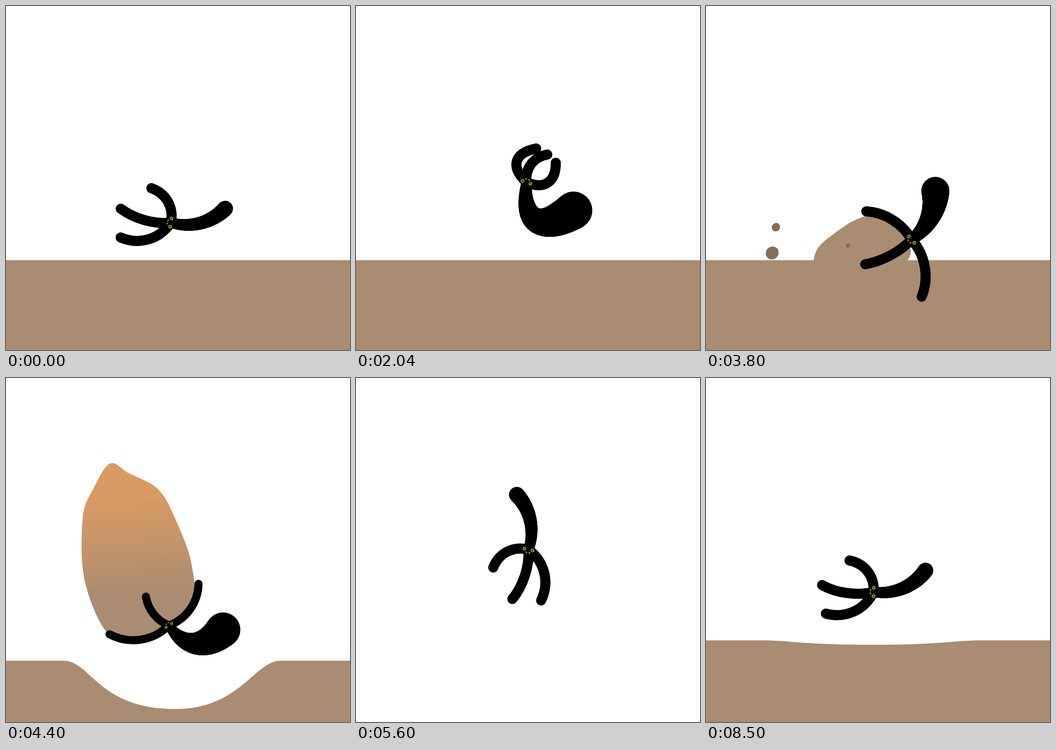
An HTML page with a canvas that plays this animation: 748 by 748 pixels, repeating every 8540 ms.

```html
<!DOCTYPE html>
<html lang="en">
<head>
<meta charset="utf-8">
<title>Lifting a boulder</title>
<style>
  html, body { margin: 0; width: 100%; height: 100%; overflow: hidden; background: #fff; }
  canvas { display: block; }
</style>
</head>
<body>
<canvas id="stage" width="748" height="748"></canvas>
<script>
const ctx = document.getElementById('stage').getContext('2d');
const LOOP = 8540, STEP = 40, SIZE = 748, GROUND = 552.7;
const SOIL = '#a98c72', STONE = '#846c5a', ORANGE = '#d99a63', YELLOW = '#dce600';

const lerp = (a, b, k) => a + (b - a) * k;
const ramp = (t, from, to) => Math.min(1, Math.max(0, (t - from) / (to - from)));
const turn = ([x, y], degrees, scale = 1) => {
  const c = Math.cos(degrees * Math.PI / 180) * scale;
  const s = Math.sin(degrees * Math.PI / 180) * scale;
  return [x * c - y * s, x * s + y * c];
};

// Blends numbers, arrays and objects of the same form.
function mix(a, b, k) {
  if (typeof a === 'number') return lerp(a, b, k);
  if (Array.isArray(a)) return a.map((v, i) => mix(v, b[i], k));
  return Object.fromEntries(Object.keys(a).map(key => [key, mix(a[key], b[key], k)]));
}

// Limb angles are seen from the face; bow is how far a limb bends away from its chord.
const BOWS = [.8, -.48, -1];
const stand = {
  x: 375, y: 373, angle: 12, scale: 1, bow: 21, angles: [141, 96, 64], lengths: [86, 113, 114],
  tail: { angle: -114, length: 122, bow: 17, radius: 17 }
};
const lean = {
  x: 372, y: 382, angle: 202, scale: 1, bow: 33, angles: [126, 107, 87], lengths: [76, 75, 76],
  tail: { angle: -170, length: 118, bow: 61, radius: 41 }
};
const reach = {
  x: 353, y: 398, angle: 178, scale: 1, bow: 31, angles: [129, 104, 75], lengths: [82, 80, 81],
  tail: { angle: -161, length: 130, bow: 48, radius: 37 }
};
const grab = {
  x: 447, y: 508, angle: 409, scale: 1, bow: 18, angles: [163, 103, 31], lengths: [116, 114, 126],
  tail: { angle: -113, length: 118, bow: 15, radius: 30.5 }
};
const lift = {
  x: 354, y: 538, angle: 504.5, scale: .8, bow: 27, angles: [161, 87, 27], lengths: [139, 100, 163],
  tail: { angle: -140, length: 148, bow: 43, radius: 47 }
};
const lying = { ...stand, x: 358.5, y: 471, angle: 99.5 };
const sway = { ...reach, x: 361, y: 396, angle: 181, tail: { ...reach.tail, radius: 41 } };
const windUp = { ...reach, x: 342, y: 402, angle: 170 };
const leap = { ...grab, x: 480, y: 372, angle: 275 };
const hold = { ...lift, x: 350, y: 466, angle: 523, scale: .78 };

const keys = [
  [0, lying], [1120, lean], [1560, sway], [2000, lean], [2440, sway], [2960, reach],
  [3040, windUp], [3360, leap], [3800, grab], [4400, lift], [4560, hold], [5200, hold],
  [5600, { ...stand, angle: 372 }], [5601, stand], [8100, stand], [LOOP, lying]
];

// The body turns around a point beside the face, and that point moves in straight lines.
const pivotOffset = pose => turn([49.4, -33], pose.angle, pose.scale);
function pivot(pose) {
  const [dx, dy] = pivotOffset(pose);
  return { x: pose.x - dx, y: pose.y - dy };
}

function poseAt(t) {
  const i = keys.findIndex(key => key[0] > t);
  const [from, a] = keys[i - 1], [to, b] = keys[i];
  const k = (t - from) / (to - from);
  const pose = mix(a, b, k), center = mix(pivot(a), pivot(b), k), [dx, dy] = pivotOffset(pose);
  return { ...pose, x: center.x + dx, y: center.y + dy };
}

// Outline of the boulder, measured from the face of the one lifting it.
const boulder = [
  [-128, -352], [-87, -331], [-22, -295], [18, -223], [50, -130], [46, -38],
  [-64, 25], [-132, 18], [-183, -98], [-187, -235], [-164, -297]
];

function drawBoulder(x, y, angle, scale) {
  const points = boulder.map(p => turn(p, angle, scale)).map(p => [p[0] + x, p[1] + y]);
  const at = i => points[(i + points.length) % points.length];
  const handle = (i, sign) => at(i).map((v, d) => v + sign * (at(i + 1)[d] - at(i - 1)[d]) / 6);
  ctx.beginPath();
  ctx.moveTo(...at(0));
  points.forEach((_, i) => ctx.bezierCurveTo(...handle(i, 1), ...handle(i + 1, -1), ...at(i + 1)));
  const shade = ctx.createLinearGradient(0, 280, 14, 495);
  shade.addColorStop(0, ORANGE);
  shade.addColorStop(1, SOIL);
  ctx.fillStyle = shade;
  ctx.fill();
}

// Stones fly away from the point of impact and fall back.
function drawStones(seconds) {
  ctx.fillStyle = STONE;
  for (const [x, y, radius] of [[152, 481, 9.5], [144, 537, 14.5], [309, 521, 5]]) {
    const dx = (x - 330) * seconds, dy = (y - 560) * seconds + 600 * seconds ** 2;
    ctx.beginPath();
    ctx.ellipse(x + dx, y + dy, radius, radius * .93, -.8, 0, 7);
    ctx.fill();
  }
}

function drawGround(level, depth) {
  const bottom = level + depth;
  ctx.fillStyle = SOIL;
  ctx.beginPath();
  ctx.moveTo(0, level);
  ctx.lineTo(125, level);
  ctx.bezierCurveTo(185, level, 200, bottom, 368, bottom);
  ctx.bezierCurveTo(510, bottom, 540, level, 597, level);
  ctx.lineTo(SIZE, level);
  ctx.lineTo(SIZE, SIZE + 200);
  ctx.lineTo(0, SIZE + 200);
  ctx.fill();
}

// Control points and tip of a limb that starts at the face.
function limbCurve(angle, length, bow) {
  const control = [length / 2, bow / .45];
  return [
    ...turn(control, angle, .6),
    ...turn([lerp(length, control[0], .6), control[1] * .6], angle),
    ...turn([length, 0], angle)
  ];
}

function drawTail({ angle, length, bow, radius }) {
  const [ax, ay, bx, by, tx, ty] = limbCurve(angle, length, bow);
  const bezier = (a, b, c, u) => 3 * a * u * (1 - u) ** 2 + 3 * b * u * u * (1 - u) + c * u ** 3;
  for (let u = 0; u <= 1; u += 1 / 128) {
    ctx.beginPath();
    ctx.arc(bezier(ax, bx, tx, u), bezier(ay, by, ty, u), lerp(11, radius, u), 0, 7);
    ctx.fill();
  }
}

function drawFace() {
  ctx.strokeStyle = ctx.fillStyle = YELLOW;
  for (const side of [-1, 1]) {
    ctx.lineWidth = 1.3;
    ctx.beginPath();
    ctx.arc(side * 9, 0, 3, 0, 7);
    ctx.stroke();
    ctx.beginPath();
    ctx.arc(side * 9, 0, 1, 0, 7);
    ctx.fill();
    ctx.lineWidth = 1.8;
    ctx.beginPath();
    ctx.moveTo(side * 5, 5.5);
    ctx.lineTo(side * 2, 8);
    ctx.stroke();
  }
}

function drawFigure({ x, y, angle, scale, bow, angles, lengths, tail }) {
  ctx.save();
  ctx.translate(x, y);
  ctx.rotate(angle * Math.PI / 180);
  ctx.scale(scale, scale);
  ctx.fillStyle = ctx.strokeStyle = '#000';
  ctx.lineCap = 'round';
  ctx.lineWidth = 22;
  drawTail(tail);
  angles.forEach((direction, i) => {
    ctx.beginPath();
    ctx.moveTo(0, 0);
    ctx.bezierCurveTo(...limbCurve(direction, lengths[i], bow * BOWS[i]));
    ctx.stroke();
  });
  ctx.lineCap = 'butt';
  drawFace();
  ctx.restore();
}

function draw(t) {
  const pose = poseAt(t);
  const rise = ramp(t, 3560, 3800), grow = ramp(t, 3800, 4400), heave = ramp(t, 4400, 4560);
  const drop = ramp(t, 5200, 5600), back = ramp(t, 8100, LOOP);
  const buried = 1 - grow;

  ctx.fillStyle = '#fff';
  ctx.fillRect(0, 0, SIZE, SIZE);
  if (rise > 0 && drop < 1) {
    drawBoulder(
      pose.x - 35 * buried,
      pose.y - 33 * buried + 140 * (1 - rise) + 800 * drop,
      18.5 * heave - 103 * buried,
      lerp(.6, 1, grow) * lerp(1, .975, heave));
  }
  if (t > 3600 && t < 4160) drawStones((t - 3800) / 1000);
  const lowered = GROUND + 62 * grow + 11 * heave;
  drawGround(lerp(lerp(lowered, SIZE, drop), GROUND, back), 105 * grow * (1 - back));
  drawFigure(pose);
}

const start = performance.now();
function frame() {
  const t = (performance.now() - start) % LOOP;
  const shift = t < 8100 ? 0 : 8100 % STEP; // the long rest ends half a step late
  draw(Math.floor((t - shift) / STEP) * STEP + shift);
  requestAnimationFrame(frame);
}
frame();
</script>
</body>
</html>
```
